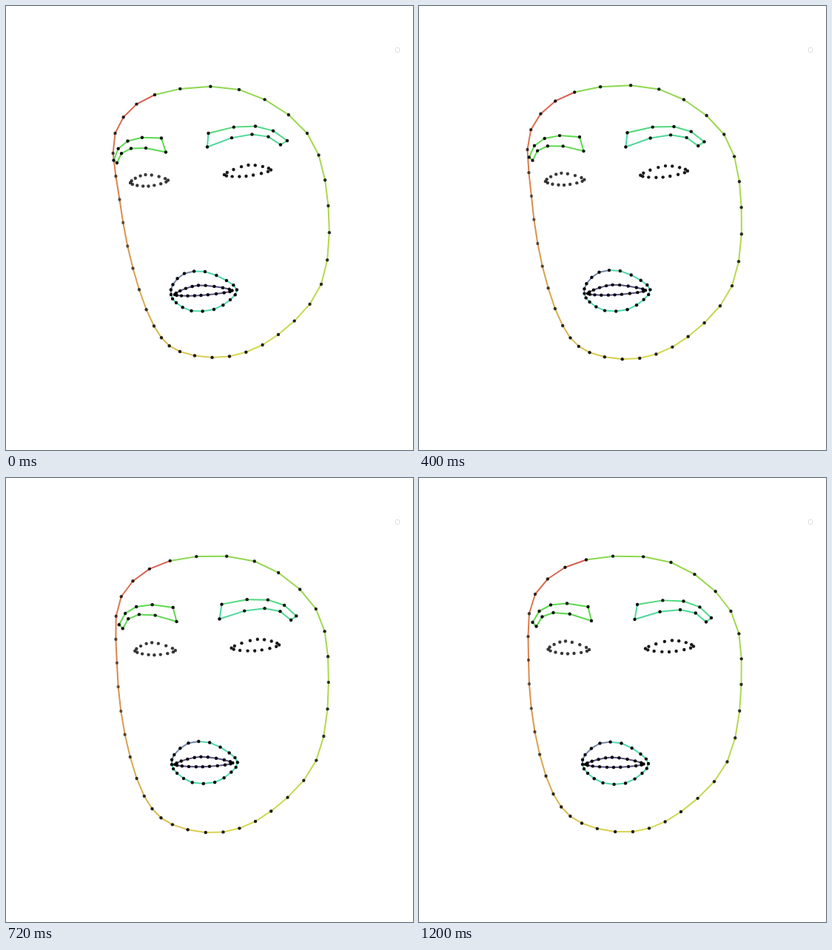
An HTML page with a canvas for the animation above (1280 ms loop, 550x600 px).

```html
<!DOCTYPE html>
<html lang="en">
<head>
<meta charset="utf-8">
<title>Turning face outline</title>
<style>
html, body { margin: 0; width: 100%; height: 100%; overflow: hidden; background: #fff; }
canvas { display: block; width: 550px; height: 600px; }
</style>
</head>
<body>
<canvas id="stage" width="550" height="600"></canvas>
<script>
const ctx = document.getElementById('stage').getContext('2d');
const LOOP = 1280, STEP = 80;

const tint = hue => `hsl(${hue}, 64%, 58%)`;
const bump = (i, at) => Math.exp(-(((i - at) / 4) ** 2));
const blend = (points, weights) =>
  [0, 1].map(axis => points.reduce((sum, p, k) => sum + p[axis] * weights[k], 0));

// Closed smooth curve through the key points, with n dots per span.
const ring = n => keys => {
  const at = k => keys[(k + keys.length) % keys.length];
  return Array.from({ length: keys.length * n }, (_, i) => {
    const k = Math.floor(i / n), u = (i % n) / n, v = 1 - u;
    return blend([at(k - 1), at(k), at(k + 1), at(k + 2)], [
      -u * v * v / 2,
      v * (2 + 2 * u - 3 * u * u) / 2,
      u * (1 + 4 * u - 3 * u * u) / 2,
      -u * u * v / 2
    ]);
  });
};

// Two bows of five dots, each a parabola through three key points.
const bows = keys => [0, 3].flatMap(k => [0, 0.5, 1, 1.5, 2].map(u =>
  blend(keys.slice(k, k + 3), [(u - 1) * (u - 2) / 2, u * (2 - u), u * (u - 1) / 2])));

// Key points of each part before and after the turn.
const parts = [
  { // face
    from: [[201, 120], [315, 113], [407, 172], [435.5, 270], [426, 376], [368, 444],
      [302, 473.5], [235, 467], [200, 432.5], [171.5, 354.5], [153.5, 261.5], [147.5, 172]],
    to: [[226, 110.5], [340.5, 114], [421.5, 180], [435.5, 279], [416.5, 383.5], [354, 451],
      [289, 478], [220, 466.5], [181.5, 427], [156.5, 343], [148, 246], [157, 157]],
    trace: ring(3),
    line: i => tint(95 - 1.6 * i - 0.026 * i * i),
    ink: i => 0.88 - 0.34 * bump(i, 29) - 0.1 * bump(i, 10)
  },
  { // left brow
    from: [[145.5, 208.5], [164.5, 182.5], [210, 178.5], [216, 197.5], [169, 192.5], [150, 212]],
    to: [[153.5, 195], [178, 171.5], [228.5, 174], [233, 193], [181.5, 182], [158.5, 200.5]],
    trace: bows,
    line: () => tint(114),
    ink: () => 0.92
  },
  { // right brow
    from: [[273.5, 172], [337, 162.5], [380, 182], [371, 187.5], [332.5, 173.5], [272, 190.5]],
    to: [[295, 171], [357.5, 166.5], [395, 189], [388, 194.5], [353, 178], [291.5, 191]],
    trace: bows,
    line: i => tint(138 + 2 * i),
    ink: () => 0.95
  },
  { // left eye
    from: [[168, 239], [188.5, 228], [219, 235.5], [192.5, 243.5]],
    to: [[174.5, 231.5], [198, 220.5], [230, 232], [201, 237.5]],
    trace: ring(4),
    ink: () => 0.78
  },
  { // right eye
    from: [[295, 228], [327.5, 215], [358, 221.5], [324.5, 230]],
    to: [[306, 230.5], [342, 219.5], [371, 227.5], [338, 235]],
    trace: ring(4),
    ink: () => 0.9
  },
  { // outer lips
    from: [[225.5, 376.5], [241, 361.5], [269, 359], [298, 371], [312, 383.5],
      [303, 397], [281, 410], [250.5, 412], [230, 401], [223, 390]],
    to: [[224.5, 374], [244.5, 358.5], [273.5, 358.5], [299.5, 373], [310, 386],
      [301.5, 399], [279, 412.5], [248.5, 412], [228, 399], [221, 387]],
    trace: ring(2),
    line: i => i < 3 || i > 17 ? '#7185aa' : tint(161),
    ink: () => 0.97,
    mouth: 1
  },
  { // inner lips
    from: [[228, 390], [260, 377.5], [305.5, 384.5], [263.5, 391]],
    to: [[225, 387], [261, 377.5], [303.5, 386.5], [263, 391]],
    trace: ring(5),
    line: () => '#5b4f86',
    ink: () => 0.97,
    mouth: 1
  }
];

function poseAt(t) {
  const s = t / 1200, u = Math.min(t / 965, 1);
  return {
    turn: u * u * (3 - 2 * u),
    nod: Math.sin(Math.PI * s) ** 2,
    drift: Math.sin(Math.PI * s ** 1.3) ** 2
  };
}

function place(part, { turn, nod, drift }) {
  const keys = part.from.map((p, k) => blend([p, part.to[k]], [1 - turn, turn]));
  const mouth = part.mouth || 0;
  return part.trace(keys).map(([x, y]) => {
    const u = (x - 290) / 100, v = (y - 300) / 100;
    return [
      x + drift * (1 - 0.3 * u + 0.8 * v + 0.9 * mouth),
      y + nod * (0.2 - 1.15 * u + 0.6 * v - 1.9 * mouth)
    ];
  });
}

function drawPart(part, pose) {
  const points = place(part, pose);
  if (part.line) {
    points.forEach((p, i) => {
      ctx.strokeStyle = part.line(i);
      ctx.beginPath();
      ctx.moveTo(...p);
      ctx.lineTo(...points[(i + 1) % points.length]);
      ctx.stroke();
    });
  }
  points.forEach(([x, y], i) => {
    ctx.fillStyle = `rgba(0, 0, 0, ${part.ink(i)})`;
    ctx.beginPath();
    ctx.arc(x, y, 2.2, 0, Math.PI * 2);
    ctx.fill();
  });
}

function drawBox() {
  ctx.strokeStyle = '#dcdcdc';
  ctx.lineWidth = 1;
  ctx.beginPath();
  ctx.roundRect(526.5, 56.5, 5, 6, 1);
  ctx.stroke();
}

function draw(now) {
  const pose = poseAt(Math.floor((now % LOOP) / STEP) * STEP);
  ctx.fillStyle = '#fff';
  ctx.fillRect(0, 0, 550, 600);
  drawBox();
  ctx.lineWidth = 2;
  ctx.lineCap = 'round';
  parts.forEach(part => drawPart(part, pose));
  requestAnimationFrame(draw);
}

requestAnimationFrame(draw);
</script>
</body>
</html>
```
